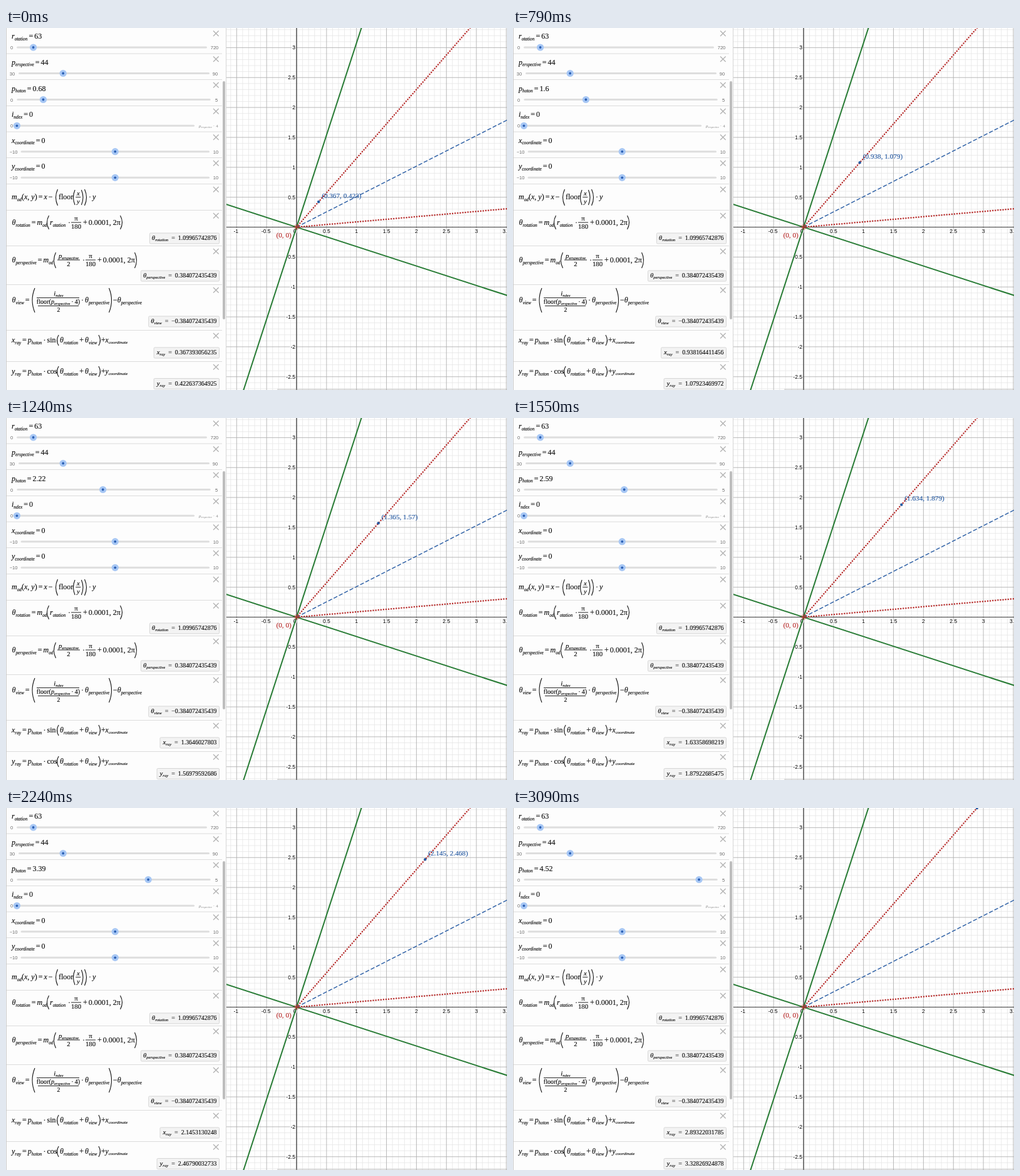
An HTML page for the animation above (3.12 s loop, 800 by 579 pixels).

```html
<!DOCTYPE html>
<html lang="en">
<head>
<meta charset="utf-8">
<title>Ray in a rotated view</title>
<style>
html, body { margin: 0; width: 100%; height: 100%; overflow: hidden; background: #fff; }
svg { display: block; width: 800px; height: 579px; }
text { white-space: pre; }
.math { font-family: "Liberation Serif", "Times New Roman", serif; fill: #111; stroke: #111; stroke-width: .15; }
.sans { font-family: "Liberation Sans", Arial, sans-serif; }
.range { font-size: 7.5px; fill: #6c6c6c; text-anchor: middle; }
.tick { font-size: 8.5px; fill: #000; stroke: #fff; stroke-width: 2.5; paint-order: stroke; }
.tag { font: 11.2px "Liberation Serif", "Times New Roman", serif; stroke-width: .15; }
.it { font-style: italic; }
</style>
</head>
<body>
<svg id="stage" viewBox="0 0 800 579"></svg>
<script>
const stage = document.getElementById('stage');
const RED = '#b72c2b', GREEN = '#277b34', BLUE = '#275ba3';

function add(tag, attrs, parent = stage, text) {
  const el = document.createElementNS('http://www.w3.org/2000/svg', tag);
  for (const key in attrs) el.setAttribute(key, attrs[key]);
  if (text !== undefined) el.textContent = text;
  return parent.appendChild(el);
}
const path = (d, stroke, width, extra) =>
  add('path', { d, stroke, 'stroke-width': width, fill: 'none', ...extra });
const rect = (x, y, width, height, fill, extra) =>
  add('rect', { x, y, width, height, fill, ...extra });
const dot = (cx, cy, r, fill, extra) => add('circle', { cx, cy, r, fill, ...extra });

// Fills a text with maths: _word is a subscript, ~word upright, single letters italic.
function typeset(el, src, size, gap = 2) {
  el.textContent = '';
  const sub = size * .61, drop = size * .21;
  let dx = 0, shift = 0;
  for (const tok of src.match(/_\w+|~\w+|[=+−·]|[a-zθ]|[^_~=+−·a-zθ]+/g) || []) {
    const isSub = tok[0] === '_', isOp = '=+−·'.includes(tok);
    const dy = (isSub ? drop : 0) - shift;
    shift = isSub ? drop : 0;
    if (isOp) dx += gap;
    add('tspan', {
      dx, dy, 'font-size': isSub ? sub : size,
      class: isSub || /^[a-zθ]$/.test(tok) ? 'it' : ''
    }, el, tok.replace(/^[_~]/, ''));
    dx = isOp ? gap : 0;
  }
}
function math(x, y, src, size = 12, anchor = 'start', gap = 2) {
  const el = add('text', { x, y, class: 'math', 'text-anchor': anchor });
  typeset(el, src, size, gap);
  return el;
}
function frac(cx, y, half, top, bottom) {
  path(`M${cx - half} ${y}H${cx + half}`, '#111', .9);
  math(cx, y - 3, top, 10.8, 'middle');
  math(cx, y + 10, bottom, 10.8, 'middle');
}
// Tall brackets; a negative w opens to the left.
function paren(x, top, bottom, w) {
  const mid = (top + bottom) / 2;
  path(`M${x + w} ${top}Q${x - w} ${mid} ${x + w} ${bottom}`, '#111', 1.1);
}

// ---------- graph ----------
const OX = 464, OY = 318.5, UNIT = 95.7, LEFT = 352;
const px = x => OX + x * UNIT, py = y => OY - y * UNIT;

rect(LEFT, 0, 448, 579, '#fff');
function grid(step, color, width, skip) {
  let d = '';
  const f = step * UNIT;
  for (let i = -30; i <= 40; i++) {
    if (skip && i % skip === 0) continue;
    const x = OX + i * f, y = OY - i * f;
    if (x > LEFT && x < 800) d += `M${x} 0V579`;
    if (y > 0 && y < 579) d += `M${LEFT} ${y}H800`;
  }
  path(d, color, width);
}
grid(.1, '#e6e6e6', .8, 5);
grid(.5, '#b2b2b2', .9);
path(`M${LEFT} ${OY}H800M${OX} 0V579`, '#3a3a3a', 1.2);

function tick(x, y, value, anchor) {
  add('text', { x, y, class: 'sans tick', 'text-anchor': anchor }, stage, value);
}
for (let v = -1; v <= 3.5; v += .5) tick(px(v) - (v < 0 ? 1 : v ? 0 : 3), 328, v, 'middle');
for (let v = -2.5; v <= 3; v += .5) if (v) tick(462, py(v) + 3, v, 'end');

// Lines are given by their angle clockwise from the vertical axis.
function ray(deg, from, color, width, extra) {
  const a = deg * Math.PI / 180, s = Math.sin(a), c = Math.cos(a);
  path(`M${px(from * s)} ${py(from * c)}L${px(8 * s)} ${py(8 * c)}`, color, width, extra);
}
const ROT = 63, HALF = 22;
ray(ROT - 45, -8, GREEN, 2);
ray(ROT + 45, -8, GREEN, 2);
ray(ROT, 0, BLUE, 1.4, { 'stroke-dasharray': '6.5 3' });
for (const side of [-1, 1])
  ray(ROT + side * HALF, 0, RED, 2.5, { 'stroke-dasharray': '0 4.1', 'stroke-linecap': 'round' });

dot(OX, OY, 4.5, RED, { opacity: .35 });
dot(OX, OY, 2, RED, { opacity: .7 });
add('text', { x: 431.5, y: 334.5, class: 'tag', fill: RED, stroke: RED }, stage, '(0, 0)');
const photon = dot(0, 0, 2.2, BLUE);
const tag = add('text', { class: 'tag', fill: BLUE, stroke: BLUE });
rect(433, 577, 367, 2, '#999', { opacity: .3 });

// ---------- panel ----------
rect(0, 0, LEFT, 579, '#fdfdfd');
path('M.5 0V579', '#ccc', 1);
path('M351.5 0V579', '#d5d5d5', 1);
rect(346, 85, 4, 381, '#bdbdbd', { rx: 2 });

const tops = [0, 41, 82.5, 124.5, 166, 207.5, 249.5, 291.5, 348.5, 410.5, 483.5, 533.5];
for (const y of tops) {
  if (y) path(`M1 ${y}H345`, '#dcdcdc', 1);
  const c = y + 8.7;
  path(`M331 ${c - 4.3}l8.6 8.6m0 -8.6l-8.6 8.6`, '#b4b4b4', 1.4);
}

function slider(row, name, value, min, max, x1, x2, minX, maxX) {
  const y = [31, 72.5, 114.5, 156.3, 197.7, 239.3][row];
  const label = math(9, y - 14, '');
  rect(x1, y - 1.5, x2 - x1, 3, '#dedede', { rx: 1.5 });
  const range = (x, v) =>
    add('text', { x, y: y + 3, class: 'sans range' }, stage, String(v).replace('-', '−'));
  range(minX, min);
  if (maxX) range(maxX, max);
  const knob = add('g', {});
  add('circle', { r: 5.6, fill: '#a7c7f4' }, knob);
  add('circle', { r: 1.9, fill: '#2b60b5' }, knob);
  const set = v => {
    typeset(label, `${name}=${v}`, 12);
    knob.setAttribute('transform', `translate(${x1 + (v - min) / (max - min) * (x2 - x1)} ${y})`);
  };
  set(value);
  return set;
}
slider(0, 'r_otation', 63, 0, 720, 17, 321, 9, 333);
slider(1, 'p_erspective', 44, 30, 90, 20, 325, 10, 334);
const setPhoton = slider(2, 'p_hoton', 0, 0, 5, 17.4, 326.7, 9, 336);
slider(3, 'i_ndex', 0, 0, 176, 17.4, 301, 9);
slider(4, 'x_coordinate', 0, -10, 10, 23.5, 325, 12, 335);
slider(5, 'y_coordinate', 0, -10, 10, 23.5, 325, 12, 335);
const product = math(308, 158.5, 'p_erspective·4', 7);
product.style.cssText = 'fill:#888;stroke:none';

// m_od
math(9, 274, 'm_od(x, y)=x−');
paren(79.5, 258, 284, 3);
math(84, 274, '~floor');
paren(107.5, 259, 283, 2.6);
frac(115.3, 270.5, 4, 'x', 'y');
paren(123, 259, 283, -2.6);
paren(128.5, 258, 284, -3);
math(130, 274, '·y');

// Tail shared by both angle formulas.
function degrees(x, y, top, bottom) {
  math(x - 15, y + 4, '·');
  frac(x, y, 8, 'π', '180');
  math(x + 9, y + 4, '+0.0001, 2π');
  paren(x + 73.5, top, bottom, -3);
}
math(9.5, 315, 'θ_rotation=m_od');
paren(65.5, 300, 322, 3);
math(70, 315, 'r_otation');
degrees(112, 311, 300, 322);

math(9.5, 375, 'θ_perspective=m_od');
paren(76.5, 359, 384, 3);
frac(100, 371, 18, 'p_erspective', '2');
degrees(135, 371, 359, 384);

// view angle
math(9.5, 439, 'θ_view=');
paren(42, 416, 455, 4);
math(84, 428, 'i_ndex', 10.8, 'middle');
path('M49 431.5H117', '#111', .9);
math(83.5, 441, '~floor(p_erspective·4)', 10.2, 'middle');
path('M51 444.5H116', '#111', .9);
math(84, 454, '2', 9.8, 'middle');
math(118, 439, '·θ_perspective');
paren(168.5, 416, 455, -4);
math(171, 439, '−θ_perspective', 12, 'start', 0);

// ray coordinates
for (const [name, y] of [['x', 503], ['y', 553]]) {
  math(9, y, `${name}_ray=p_hoton·${name === 'x' ? '~sin' : '~cos'}`);
  paren(81.5, y - 12, y + 5, 2.6);
  math(86, y, 'θ_rotation+θ_view');
  paren(150.5, y - 12, y + 5, -2.6);
  math(152, y, `+${name}_coordinate`, 11.6, 'start', 0);
}

function result(top, name) {
  const box = rect(0, top, 0, 17, '#f3f3f3', { rx: 1.5, stroke: '#d6d6d6', 'stroke-width': 1 });
  const el = add('text', { x: 336.5, y: top + 11.2, class: 'math', 'text-anchor': 'end' });
  return v => {
    const digits = String(+v.toPrecision(12)).replace('-', '−');
    typeset(el, name, 10.8);
    add('tspan', { dx: 5, dy: -2.27, 'font-size': 10 }, el, '=');
    add('tspan', { dx: 5, 'font-size': 9.9 }, el, digits);
    const left = el.getBBox().x - 3.5;
    box.setAttribute('x', left);
    box.setAttribute('width', 340.5 - left);
  };
}
const rotation = ROT * Math.PI / 180 + .0001;
const perspective = HALF * Math.PI / 180 + .0001;
result(328, 'θ_rotation')(rotation);
result(388, 'θ_perspective')(perspective);
result(461, 'θ_view')(-perspective);
const setX = result(511, 'x_ray'), setY = result(560.5, 'y_ray');

// ---------- motion ----------
// Time, slider value, and the slightly late value used for the ray.
const keys = [
  [0, .68, .56], [790, 1.6, 1.43], [1240, 2.22, 2.08], [1850, 2.97, 2.91],
  [2240, 3.39, 3.27], [2670, 3.95, 3.83], [3090, 4.52, 4.41]
];
function valueAt(t, column) {
  let i = 1;
  while (i < keys.length - 1 && t > keys[i][0]) i++;
  const a = keys[i - 1], b = keys[i];
  const v = a[column] + (b[column] - a[column]) * (t - a[0]) / (b[0] - a[0]);
  return Math.round(v * 100) / 100;
}
// 103 even steps per loop, each starting on a multiple of 10 ms.
const LOOP = 3120, STEP = LOOP / 103;
const start = performance.now();
let last = -1;

function draw(t) {
  setPhoton(valueAt(t, 1));
  const p = valueAt(t, 2), angle = rotation - perspective;
  const x = p * Math.sin(angle), y = p * Math.cos(angle);
  setX(x);
  setY(y);
  photon.setAttribute('cx', px(x));
  photon.setAttribute('cy', py(y));
  tag.setAttribute('x', px(x) + 5);
  tag.setAttribute('y', py(y) - 6.5);
  tag.textContent = `(${+x.toFixed(3)}, ${+y.toFixed(3)})`;
}
function loop() {
  const now = (performance.now() - start) % LOOP;
  const step = Math.min(102, Math.floor((now + 5) / STEP));
  if (step !== last) {
    last = step;
    draw(Math.round(step * STEP / 10) * 10);
  }
  requestAnimationFrame(loop);
}
loop();
</script>
</body>
</html>
```
